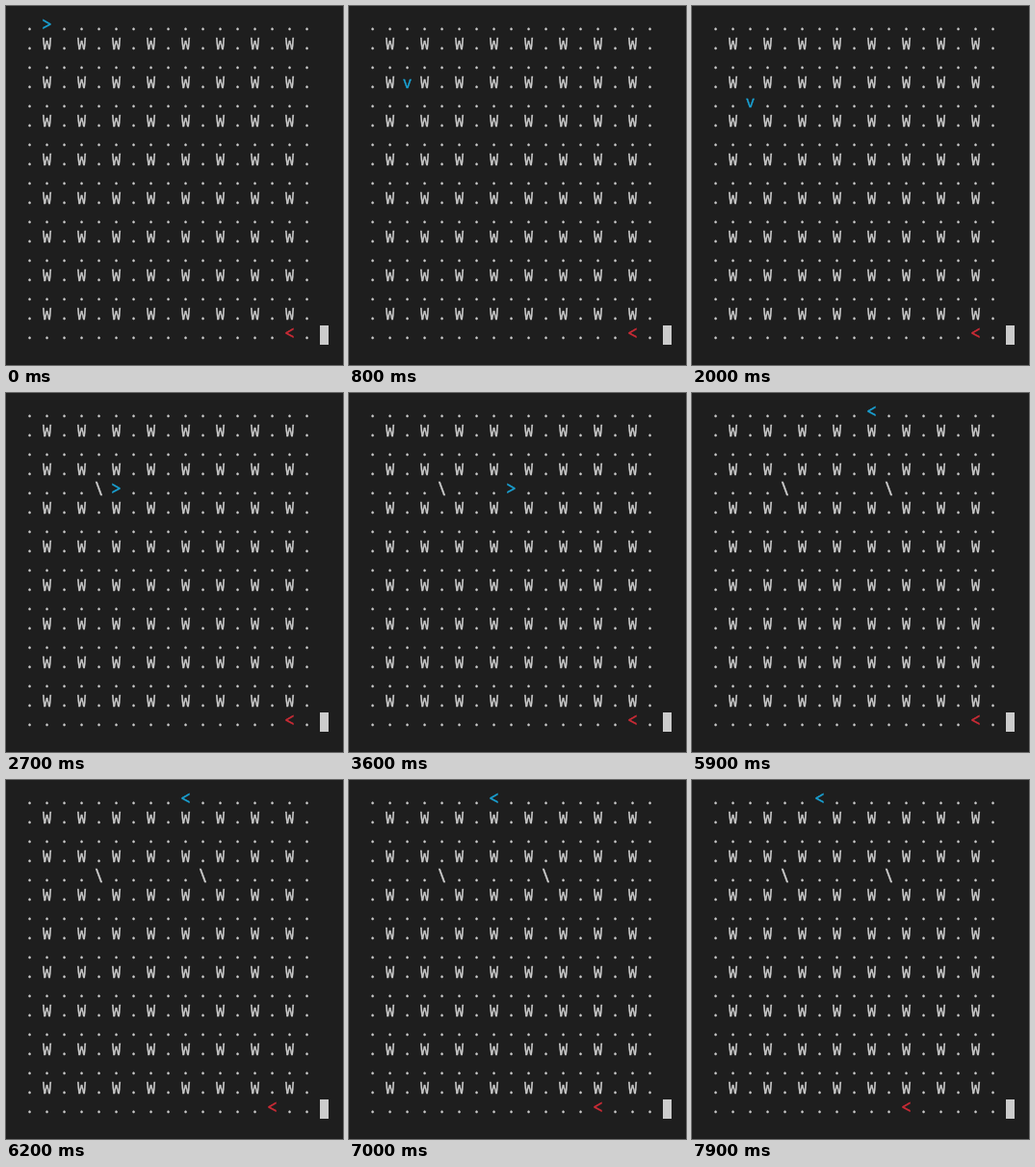
An HTML page that plays this animation: 350 by 372 pixels, repeating every 8 s.

```html
<!DOCTYPE html>
<html lang="en">
<head>
<meta charset="utf-8">
<title>Terminal maze</title>
<style>
  html, body { margin: 0; width: 100%; height: 100%; overflow: hidden; background: #1e1e1e; }
  #grid { position: absolute; left: 0; top: 0; color: #ccc;
    font: 16px/20px "Noto Sans Mono", "DejaVu Sans Mono", monospace;
    -webkit-text-stroke: 0.4px currentColor; }
  #grid span { position: absolute; width: 18px; height: 20px; text-align: center; white-space: pre; }
  #grid .tall { font-size: 19px; }
  #cursor { position: absolute; left: 326px; top: 331px; width: 9px; height: 20px; background: #ccc; }
</style>
</head>
<body>
<div id="grid"></div>
<div id="cursor"></div>
<script>
const LOOP = 8000, SIZE = 17, LEFT = 15.5, TOP = 9;
const BLUE = "#1aa2d4", RED = "#cf2c37";

// [time, column, row, glyph]
const blue = [
  [0, 1, 0, ">"], [200, 2, 0, ">"], [400, 2, 1, "v"], [600, 2, 2, "v"],
  [800, 2, 3, "v"], [1000, 2, 4, "v"], [2100, 3, 4, ">"], [2350, 4, 4, ">"],
  [2700, 5, 4, ">"], [3000, 6, 4, ">"], [3200, 7, 4, ">"], [3400, 8, 4, ">"],
  [3800, 9, 4, ">"], [4000, 10, 4, ">"], [5000, 10, 3, "^"], [5200, 10, 2, "^"],
  [5400, 10, 1, "^"], [5500, 10, 0, "^"], [5900, 9, 0, "<"], [6600, 8, 0, "<"],
  [6900, 7, 0, "<"], [7200, 6, 0, "<"]
];
const red = [
  [0, 15, 16, "<"], [6200, 14, 16, "<"], [6400, 13, 16, "<"],
  [7600, 12, 16, "<"], [7900, 11, 16, "<"]
];
const mirrors = [[2700, 4, 4, "\\"], [5000, 10, 4, "\\"]];

const grid = document.getElementById("grid");
const cells = [];
for (let i = 0; i < SIZE * SIZE; i++) {
  const col = i % SIZE, row = Math.floor(i / SIZE);
  const el = document.createElement("span");
  el.style.left = LEFT + 18 * col + "px";
  el.style.top = TOP + 20 * row + "px";
  const base = col % 2 && row % 2 ? "W" : ".";
  el.textContent = base;
  grid.append(el);
  cells.push({ el, base });
}

const at = (steps, t) => steps.filter(s => s[0] <= t).pop();
let drawn = [];

function show({ el }, glyph, color) {
  el.textContent = glyph;
  el.style.color = color;
  el.className = "<>\\".includes(glyph) ? "tall" : "";
}

function put([, col, row, glyph], color) {
  const cell = cells[row * SIZE + col];
  show(cell, glyph, color);
  drawn.push(cell);
}

function render(t) {
  drawn.forEach(cell => show(cell, cell.base, ""));
  drawn = [];
  mirrors.filter(m => m[0] <= t).forEach(m => put(m, ""));
  put(at(blue, t), BLUE);
  put(at(red, t), RED);
}

const start = performance.now();
function tick(now) {
  render(Math.max(0, now - start) % LOOP);
  requestAnimationFrame(tick);
}
render(0);
requestAnimationFrame(tick);
</script>
</body>
</html>
```
